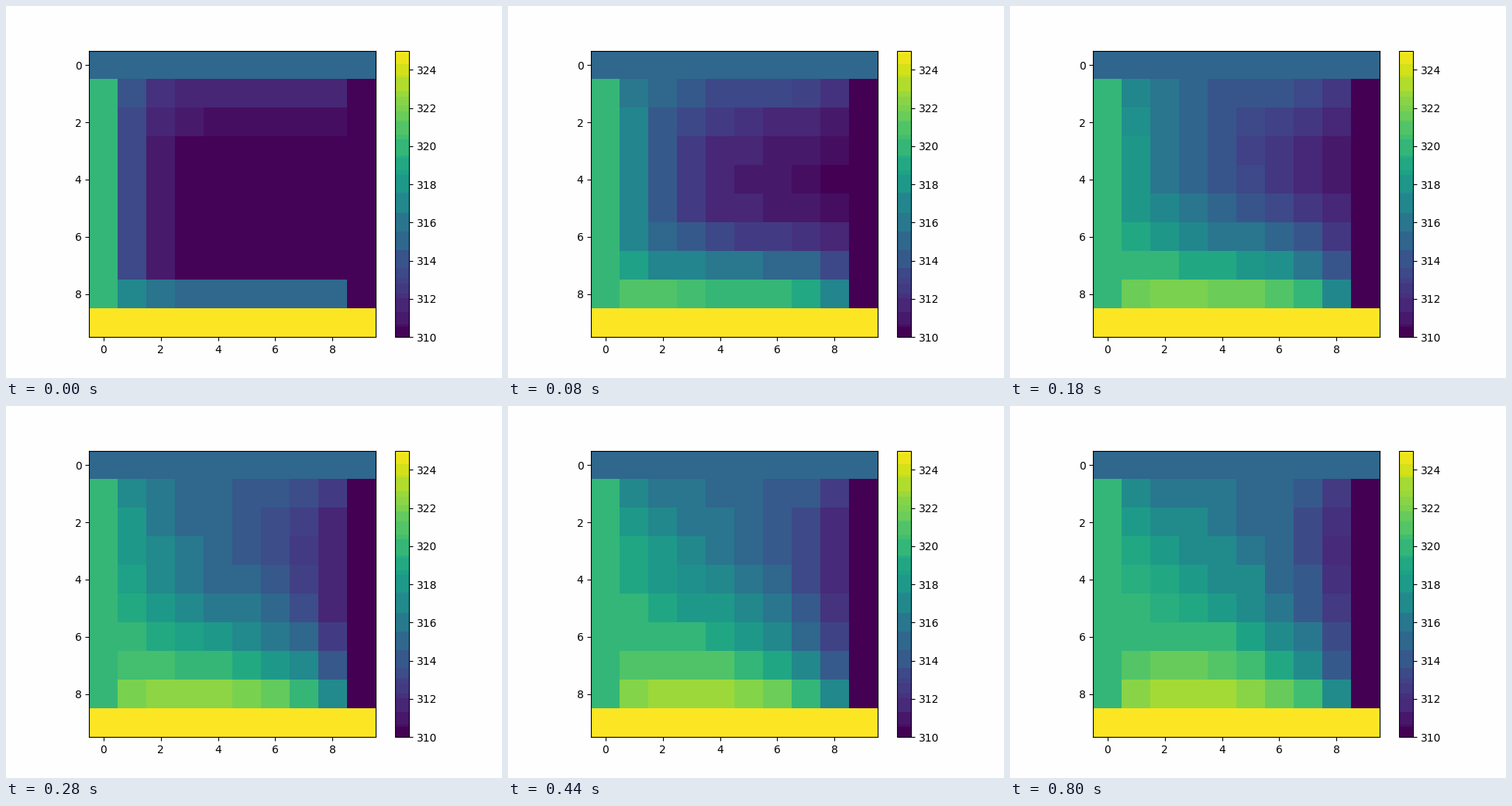
A matplotlib script for the animation above (1.87 s loop, 640 by 480 pixels).

```python
import numpy as np
import matplotlib.pyplot as plt
from matplotlib.animation import FuncAnimation
from matplotlib.colors import ListedColormap

SIZE = 10
LOW, HIGH = 310.0, 325.0
STEP_MS = 10
FRAMES = 187
FRAMES_PER_SWEEP = 2
CELL_AREA = 37 * 37        # pixels in one grid cell
BIN_AREA = 18.5 * 1.44     # pixels in one colorbar shade

VIRIDIS = plt.get_cmap("viridis")(np.arange(256), bytes=True)[:, :3].astype(int)
# Shades sharing a coarse RGB box are drawn in one common colour.
_, BOX = np.unique(VIRIDIS // [32, 16, 32], axis=0, return_inverse=True)
BOX = BOX.ravel()


def start_grid():
    grid = np.full((SIZE, SIZE), LOW)
    grid[:, 0] = 320
    grid[0, :] = 315
    grid[-1, :] = HIGH
    return grid


def sweep(grid):
    """One in-place Gauss-Seidel pass of the Laplace equation."""
    for r in range(1, SIZE - 1):
        for c in range(1, SIZE - 1):
            grid[r, c] = (grid[r - 1, c] + grid[r + 1, c]
                          + grid[r, c - 1] + grid[r, c + 1]) / 4


def banded_cmap(grid):
    """Viridis with each colour box averaged over the area it covers."""
    shade = np.clip((grid - LOW) / (HIGH - LOW) * 256, 0, 255).astype(int)
    area = BIN_AREA + CELL_AREA * np.bincount(shade.ravel(), minlength=256)
    total = np.bincount(BOX, weights=area)
    mean = [np.bincount(BOX, weights=area * VIRIDIS[:, k]) / total
            for k in range(3)]
    colors = np.floor(np.stack(mean, axis=1) + 1e-6)
    return ListedColormap(colors[BOX] / 255)


def solve(count):
    grid = start_grid()
    states = []
    for _ in range(count):
        sweep(grid)
        states.append((grid.copy(), banded_cmap(grid)))
    return states


states = solve((FRAMES - 1) // FRAMES_PER_SWEEP + 1)

fig, ax = plt.subplots(figsize=(6.4, 4.8), dpi=100)
fig.set_facecolor((254 / 255,) * 3)
image = ax.imshow(states[0][0], cmap=states[0][1], vmin=LOW, vmax=HIGH,
                  interpolation="nearest")
fig.colorbar(image)


def draw(frame):
    grid, cmap = states[frame // FRAMES_PER_SWEEP]
    image.set_data(grid)
    if image.get_cmap() is not cmap:
        image.set_cmap(cmap)
    return [image]


anim = FuncAnimation(fig, draw, frames=FRAMES, interval=STEP_MS,
                     repeat=True, repeat_delay=0, blit=False)
plt.show()
```
